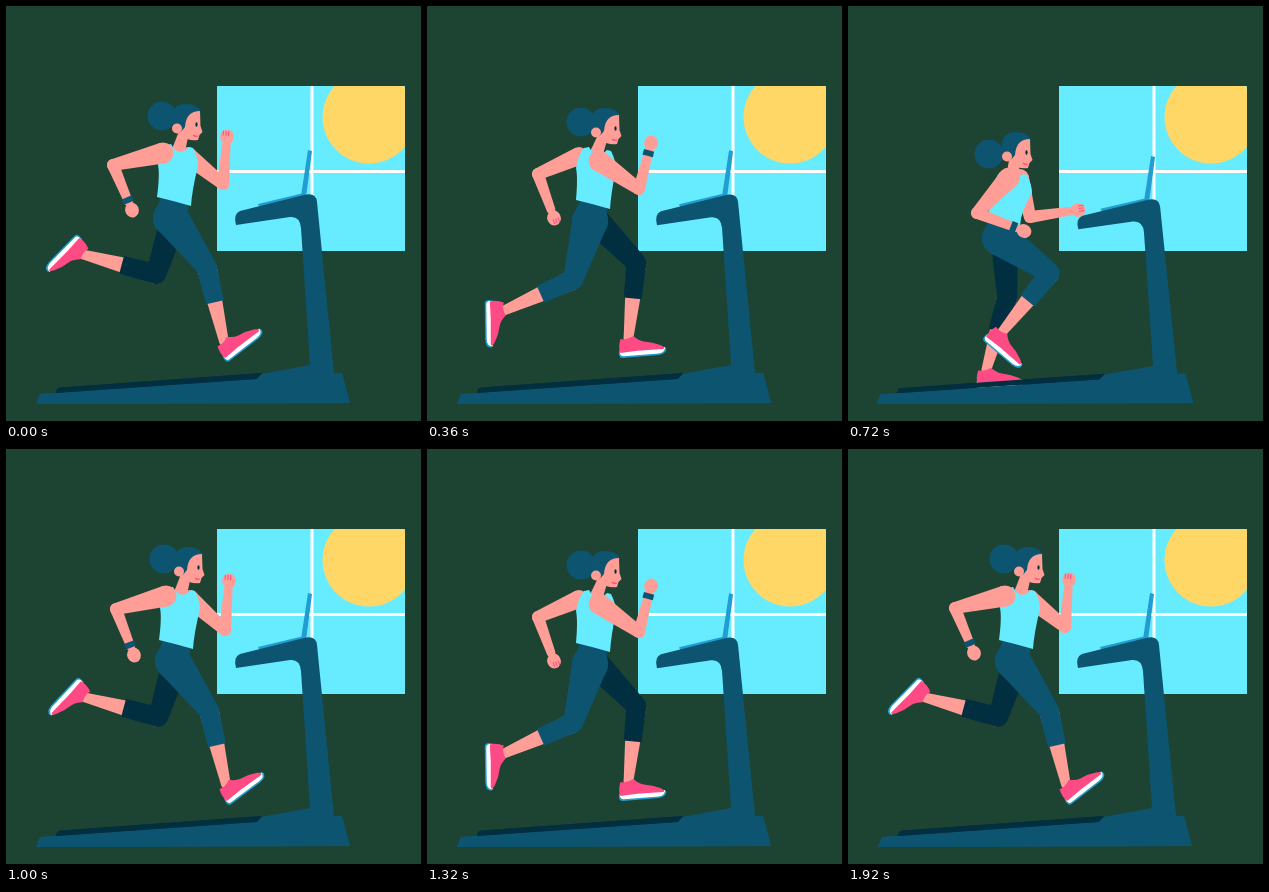
Recreate the animation shown at these times as an HTML page with a canvas. Size 415 by 415 pixels, loop 1960 ms.

```html
<!DOCTYPE html>
<html lang="en">
<head>
<meta charset="utf-8">
<title>Treadmill run</title>
<style>
html, body { margin: 0; width: 100%; height: 100%; overflow: hidden; background: #1d4432; }
canvas { display: block; width: 415px; height: 415px; }
</style>
</head>
<body>
<canvas id="stage" width="415" height="415"></canvas>
<script>
const ctx = document.getElementById('stage').getContext('2d');
const LOOP = 1960, STEP = 40, STRIDE = 24;
const C = {
  wall: '#1d4432', glass: '#66ebff', sun: '#fed766', teal: '#0d5470', dark: '#022f40',
  skin: '#ff9e96', pink: '#ff4b85', screen: '#219dd2', white: '#ffffff'
};
const THIGH = 61, SHIN = 76;

// Key phases of half a stride; the other half mirrors them on the opposite side.
const HALF = [0, 1 / 24, 4 / 24, 6 / 24, 9 / 24];
const FULL = HALF.concat(HALF.map(k => k + 0.5));

const body = {
  head: [[0, 0], [2, 0], [0, 23], [-12, 28], [-2, 4]],
  bun: [[156, 110], [158, 110], [156, 135], [141, 148], [154, 116]],
  neck: [[172, 140], [174, 140], [173, 163], [164, 167], [169, 143]],
  waist: [[168, 196], [170, 196], [170, 217], [155, 216], [166, 199]],
  press: [[0], [0], [0.1], [1], [0.05]]
};
// thigh, shin and foot angles in degrees
const leg = [
  [36, 13, -37], [36, 13, -36], [28, -9, -2], [3, -16, -2], [-16, -66, 90],
  [-18, -105, 135], [-18, -105, 134], [14, -86, 81], [55, -39, 41], [44, -6, -4]
];
// shoulder, elbow and hand positions
const arm = [
  [157, 147, 107, 159, 126, 204], [160, 147, 110, 160, 128, 206],
  [160, 172, 130, 202, 150, 232], [172, 172, 182, 211, 230, 204],
  [172, 155, 212, 183, 224, 137], [182, 150, 217, 178, 221, 131],
  [184, 150, 219, 181, 223, 132], [173, 175, 193, 211, 227, 177],
  [161, 172, 129, 207, 176, 225], [152, 150, 111, 168, 127, 212]
];

// Smooth periodic curve through unevenly spaced keys.
function sample(times, vals, period, phase) {
  const n = times.length, p = ((phase % period) + period) % period;
  let i = n - 1;
  while (times[i] > p + 1e-9) i--;
  const at = j => times[(j + n) % n] + Math.floor(j / n) * period;
  const h = at(i + 1) - at(i), u = (p - at(i)) / h;
  return vals[0].map((_, c) => {
    const v = j => vals[(j + n) % n][c];
    const slope = j => {
      const a = at(j) - at(j - 1), b = at(j + 1) - at(j);
      return ((v(j) - v(j - 1)) / a * b + (v(j + 1) - v(j)) / b * a) / (a + b);
    };
    const u2 = u * u, u3 = u2 * u;
    return (2 * u3 - 3 * u2 + 1) * v(i) + (u3 - 2 * u2 + u) * h * slope(i) +
      (3 * u2 - 2 * u3) * v(i + 1) + (u3 - u2) * h * slope(i + 1);
  });
}

const rad = d => d * Math.PI / 180;
const add = (p, x, y) => [p[0] + x, p[1] + y];
const mix = (p, q, k) => [p[0] + (q[0] - p[0]) * k, p[1] + (q[1] - p[1]) * k];
const reach = (p, deg, len) => add(p, Math.sin(rad(deg)) * len, Math.cos(rad(deg)) * len);

function shape(color, d) {
  ctx.fillStyle = color;
  ctx.fill(new Path2D(d));
}
function disc(color, [x, y], rx, ry = rx, turn = 0) {
  ctx.fillStyle = color;
  ctx.beginPath();
  ctx.ellipse(x, y, rx, ry, turn, 0, Math.PI * 2);
  ctx.fill();
}
function taper(color, p, r, q, s) {
  const a = Math.atan2(q[1] - p[1], q[0] - p[0]);
  const nx = -Math.sin(a), ny = Math.cos(a);
  ctx.fillStyle = color;
  ctx.beginPath();
  ctx.moveTo(p[0] + nx * r, p[1] + ny * r);
  ctx.lineTo(q[0] + nx * s, q[1] + ny * s);
  ctx.lineTo(q[0] - nx * s, q[1] - ny * s);
  ctx.lineTo(p[0] - nx * r, p[1] - ny * r);
  ctx.fill();
}
function limb(color, p, r, q, s) {
  taper(color, p, r, q, s);
  disc(color, p, r);
  disc(color, q, s);
}
function placed([x, y], turn, draw) {
  ctx.save();
  ctx.translate(x, y);
  ctx.rotate(turn);
  draw();
  ctx.restore();
}

function room() {
  ctx.fillStyle = C.wall;
  ctx.fillRect(0, 0, 415, 415);
  ctx.save();
  ctx.beginPath();
  ctx.rect(211, 80, 188, 165);
  ctx.clip();
  ctx.fillStyle = C.glass;
  ctx.fillRect(211, 80, 188, 165);
  disc(C.sun, [363, 111], 46.5);
  ctx.fillStyle = C.white;
  ctx.fillRect(304.5, 80, 3, 165);
  ctx.fillRect(211, 164, 188, 3);
  ctx.restore();
}

function pressed(amount, draw) {
  ctx.save();
  ctx.translate(187, 398);
  ctx.scale(1 + 0.009 * amount, 1 - 0.024 * amount);
  ctx.translate(-187, -398);
  draw();
  ctx.restore();
}
function frame() {
  shape(C.screen, 'M302 144L306 145L300 191L295 190Z M252 198L298 187L300 192L254 203Z');
  shape(C.teal, 'M234 205L298 189Q310 186 311 196L328 367H304V359L295 222Q294 210 284 211' +
    'L230 219Q227 208 234 205Z');
}
function deck() {
  shape(C.teal, 'M30 398L34 388L50 387L250 373L256 368L305 359L328 367H336L344 397Z');
  shape(C.dark, 'M50 387Q50 382 55 381.5L256 367L251 373Z');
}

function shoe(ankle, deg) {
  placed(ankle, rad(deg), () => {
    shape(C.screen, 'M-10 11Q-12 19 -7 19L29 18.5Q38 18 37 12Z');
    shape(C.white, 'M-9 10Q-11 17.5 -6 17.5L29 17Q36 16.5 36 11Z');
    shape(C.pink, 'M-8 0Q-2 2 5 -2Q10 3 15 4Q24 5 32 9Q37 12 34 13L8 13L-9 14Q-11 8 -8 0Z');
  });
}
function drawLeg(hip, [a, b, foot], color, girth) {
  const knee = reach(hip, a, THIGH), ankle = reach(knee, b, SHIN);
  taper(C.skin, knee, 10, ankle, 4.8);
  disc(C.skin, ankle, 4.8);
  shoe(ankle, foot);
  limb(color, hip, girth, knee, 10);
  taper(color, knee, 10, mix(knee, ankle, 0.47), 9);
}
function drawArm(v, near) {
  const s = [v[0], v[1]], e = [v[2], v[3]], h = [v[4], v[5]];
  const wrist = mix(e, h, 0.82);
  const a = Math.atan2(h[1] - e[1], h[0] - e[0]);
  limb(C.skin, s, near ? 10.5 : 9, e, 6);
  limb(C.skin, e, 6, wrist, 4.3);
  disc(C.skin, h, 7.5, 6.8, a);
  if (near) {
    taper(C.teal, mix(e, h, 0.72), 5.4, mix(e, h, 0.84), 5.2);
    return;
  }
  placed(h, a, () => {
    ctx.strokeStyle = C.pink;
    ctx.lineWidth = 1;
    ctx.beginPath();
    for (let y = -4; y <= 4; y += 2.7) {
      ctx.moveTo(1, y);
      ctx.lineTo(6, y);
    }
    ctx.stroke();
  });
}

function drawHead(shift, bun) {
  disc(C.teal, bun, 14.5);
  placed(shift, 0, () => {
    shape(C.teal, 'M166 110Q167 98 180 98Q192 98 195 106L182 122L172 127Q165 120 166 110Z');
    shape(C.skin, 'M194 105L194.5 120L196.5 126L193.5 129L192 134Q187 135 181 133L174 127' +
      'L179 121Q180 105 194 105Z');
    disc(C.skin, [171, 122.5], 5);
    disc(C.dark, [190.5, 118.5], 1.1, 2.2);
    ctx.strokeStyle = C.pink;
    ctx.lineWidth = 1.2;
    ctx.beginPath();
    ctx.moveTo(187, 129);
    ctx.quadraticCurveTo(189, 131, 192, 130);
    ctx.stroke();
  });
}
function drawTank(n, w) {
  const to = (x, y) => ctx.lineTo(n[0] + x, n[1] + y);
  const bend = (cx, cy, x, y) => ctx.quadraticCurveTo(n[0] + cx, n[1] + cy, n[0] + x, n[1] + y);
  ctx.fillStyle = C.glass;
  ctx.beginPath();
  ctx.moveTo(n[0] - 12, n[1] - 1);
  to(-7, -2);
  bend(0, 12, 11, 1);
  to(15, 2);
  bend(20, 12, 20, 20);
  ctx.quadraticCurveTo(w[0] + 18, w[1] - 12, w[0] + 17, w[1] + 4);
  ctx.quadraticCurveTo(w[0], w[1] - 1, w[0] - 17, w[1] - 5);
  bend(-18, 28, -20, 19);
  bend(-17, 4, -12, -1);
  ctx.fill();
}

function paint(phase) {
  const b = {};
  for (const k in body) b[k] = sample(HALF, body[k], 0.5, phase);
  const limbAt = (keys, p) => sample(FULL, keys, 1, p);
  const hip = add(b.waist, -3, 16);

  room();
  pressed(b.press[0], () => { frame(); deck(); });
  drawArm(limbAt(arm, phase + 0.5), false);
  drawLeg(add(hip, 4, -2), limbAt(leg, phase + 0.5), C.dark, 14);
  drawLeg(hip, limbAt(leg, phase), C.teal, 18);
  limb(C.teal, b.waist, 14, hip, 18);
  limb(C.skin, add(b.head, 178, 126), 5, add(b.neck, 1, 3), 6.5);
  drawTank(b.neck, b.waist);
  drawHead(b.head, b.bun);
  drawArm(limbAt(arm, phase), true);
  pressed(b.press[0], deck);
}

const start = performance.now();
function tick() {
  const t = (performance.now() - start) % LOOP;
  paint(Math.floor(t / STEP) % STRIDE / STRIDE);
  requestAnimationFrame(tick);
}
tick();
</script>
</body>
</html>
```
